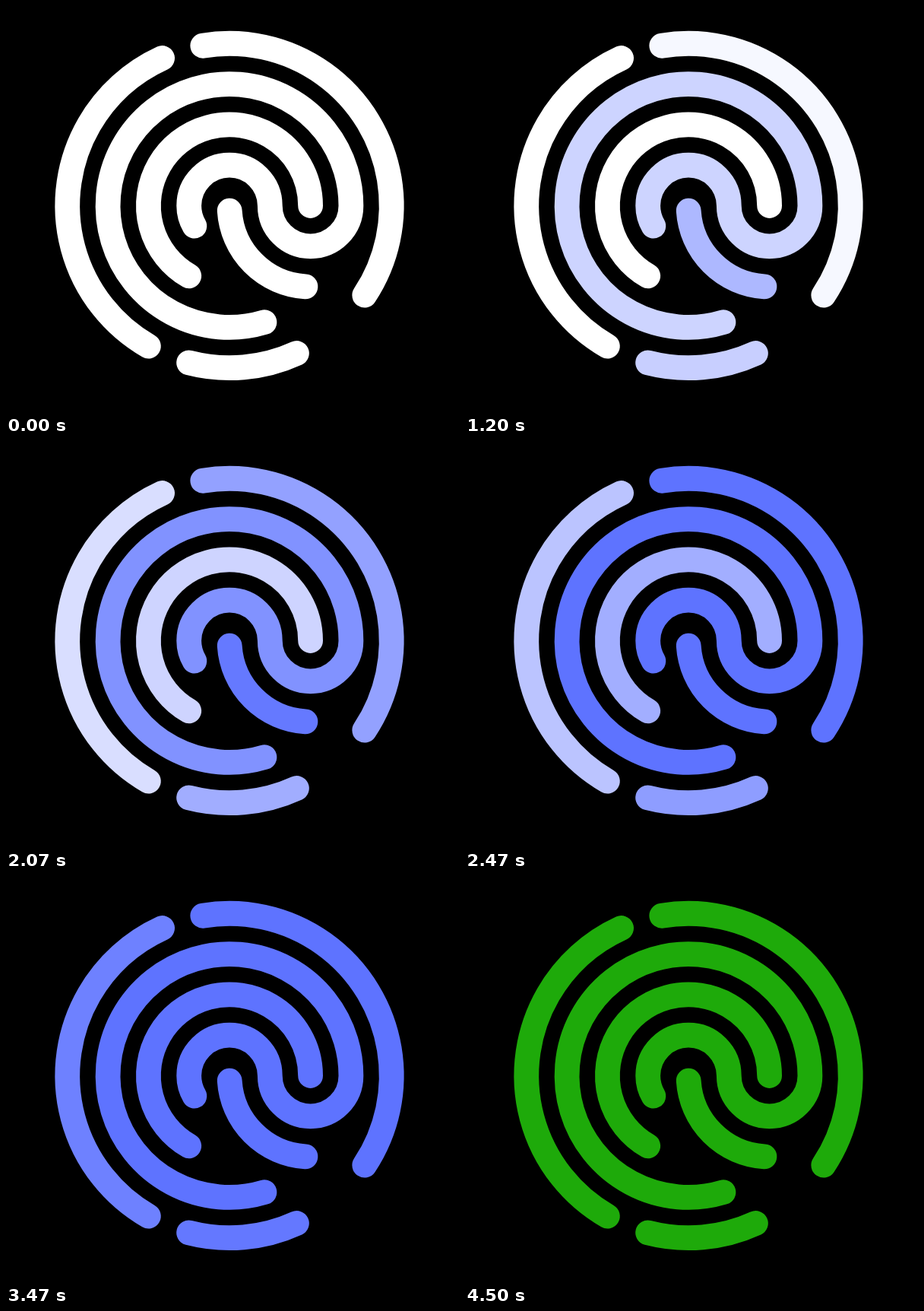
An HTML page with a canvas that plays this animation: 596x535 px, repeating every 4710 ms.

```html
<!DOCTYPE html>
<html lang="en">
<head>
<meta charset="utf-8">
<title>Fingerprint scan</title>
<style>
html, body { margin: 0; width: 100%; height: 100%; overflow: hidden; background: #000; }
canvas { display: block; }
</style>
</head>
<body>
<canvas id="stage" width="596" height="535"></canvas>
<script>
const ctx = document.getElementById('stage').getContext('2d');
const LOOP = 4710, CX = 294, CY = 262.5, GAP = 53.3, LINE = 32.8;
const WHITE = [255, 255, 255], BLUE = [94, 115, 255], GREEN = [30, 170, 10];
const GREEN_START = 3900, GREEN_FULL = 4050, RIPPLE_END = 4400;

// Arc: [centre x, radius in gaps, start degrees, end degrees, counter-clockwise]
// Fade: [time in ms, amount of blue]
const ridges = [
  { arcs: [[CX + 2 * GAP, 2, 176.4, 93.6, true]],
    fade: [[30, 0], [630, 0.23], [1630, 0.72], [2150, 1]] },
  { arcs: [[CX, 4, 104.5, 65.5, true]],
    fade: [[30, 0], [630, 0.19], [1630, 0.46], [2470, 0.7], [3600, 1]] },
  { arcs: [[CX, 3, 73.3, 360, false], [CX + 2 * GAP, 1, 0, 180, false], [CX, 1, 0, 150, true]],
    fade: [[570, 0], [1630, 0.52], [2440, 1]] },
  { arcs: [[CX, 4, 260.5, 393.5, false]],
    fade: [[1100, 0], [1630, 0.28], [2440, 1]] },
  { arcs: [[CX, 2, 120, 360, false]],
    fade: [[1630, 0], [2470, 0.58], [3200, 1]] },
  { arcs: [[CX, 4, 120, 245.5, false]],
    fade: [[1550, 0], [1630, 0.03], [2470, 0.42], [3470, 0.9], [3730, 1]] }
];

// Circles that spread behind the ridges, with their final radius
const ripples = [
  { x: 305.5, y: 276, radius: 180, line: 11 },
  { x: 297.5, y: 280.5, radius: 92, line: 5 }
];

const rad = deg => deg * Math.PI / 180;
const lerp = (a, b, p) => a + (b - a) * p;
const progress = (t, from, to) => Math.min(1, Math.max(0, (t - from) / (to - from)));
const easeOut = p => 1 - (1 - p) ** 2;
const mix = (a, b, p) => a.map((v, i) => lerp(v, b[i], p));
const css = color => `rgb(${color.map(Math.round)})`;

function sample(keys, t) {
  for (let i = 1; i < keys.length; i++) {
    const [t0, v0] = keys[i - 1], [t1, v1] = keys[i];
    if (t < t1) return lerp(v0, v1, progress(t, t0, t1));
  }
  return keys[keys.length - 1][1];
}

function drawRipple({ x, y, radius, line }, scale, color) {
  ctx.beginPath();
  ctx.arc(x, y, radius * scale, 0, 2 * Math.PI);
  ctx.lineWidth = line;
  ctx.strokeStyle = color;
  ctx.stroke();
}

function drawRidge(arcs, color) {
  ctx.beginPath();
  for (const [x, ring, from, to, ccw] of arcs) {
    ctx.arc(x, CY, ring * GAP, rad(from), rad(to), ccw);
  }
  ctx.lineWidth = LINE;
  ctx.strokeStyle = color;
  ctx.stroke();
}

function draw(t) {
  ctx.fillStyle = '#000';
  ctx.fillRect(0, 0, 596, 535);
  ctx.lineCap = 'round';
  ctx.lineJoin = 'round';

  const green = easeOut(progress(t, GREEN_START, GREEN_FULL));
  if (t > GREEN_START && t < RIPPLE_END) {
    const scale = easeOut(progress(t, GREEN_START, RIPPLE_END));
    const color = css(mix(BLUE, GREEN, green));
    ripples.forEach(r => drawRipple(r, scale, color));
  }
  for (const { arcs, fade } of ridges) {
    const scanned = mix(WHITE, BLUE, sample(fade, t));
    drawRidge(arcs, css(mix(scanned, GREEN, green)));
  }
}

const start = performance.now();
function tick() {
  draw((performance.now() - start) % LOOP);
  requestAnimationFrame(tick);
}
tick();
</script>
</body>
</html>
```
